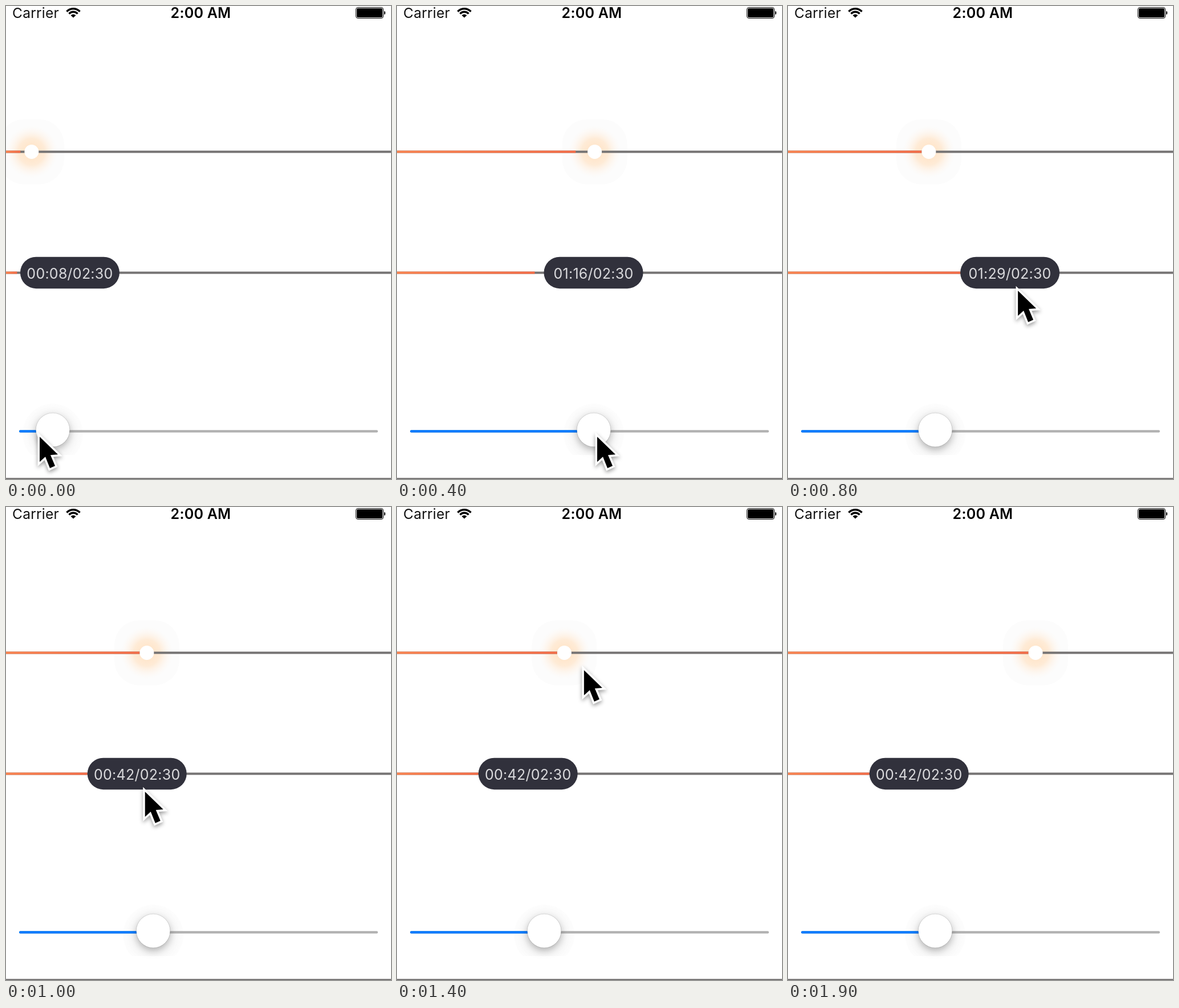
An HTML page with a canvas for the animation above (2000 ms loop, 675x829 px).

```html
<!DOCTYPE html>
<html lang="en">
<head>
<meta charset="utf-8">
<title>Sliders</title>
<style>
  html, body { margin: 0; width: 100%; height: 100%; overflow: hidden; background: #fff; }
  canvas { display: block; }
</style>
</head>
<body>
<canvas id="stage" width="675" height="829"></canvas>
<script>
const ctx = document.getElementById('stage').getContext('2d');
const W = 675, H = 829, LOOP = 2000, STEP = 100;
const FONT = 'Inter, Roboto, sans-serif';
const GRAY = '#757373';
const PILL_W = 174, PILL_RANGE = W - PILL_W;
const DOT_R = 12.5, DOT_RANGE = W - 2 * DOT_R;

const mix = (a, b, p) => a + (b - a) * p;
const progress = (t, from, to) => Math.min(1, Math.max(0, (t - from) / (to - from)));
const easeIn = p => p ** 1.52;
const easeOut = p => 1 - (1 - p) ** 1.82;
const easeInOut = p => (1 - Math.cos(Math.PI * p)) / 2;

// Drag out to a peak, then back to rest
function swing(t, start, [from, peak, rest], easeUp) {
  const up = easeUp(progress(t, start, start + STEP * 2));
  return mix(mix(from, peak, up), rest, easeInOut(progress(t, start + STEP * 2, start + STEP * 4)));
}

// The first drag moves all three sliders
const REST = .3606;
const firstDrag = (t, values) => t < 400
  ? mix(values[0], values[1], easeOut(t / 400))
  : mix(values[1], values[2], easeInOut(progress(t, 400, 600)));
const knobAt = t => firstDrag(t, [.0498, .514, REST]);
const pillAt = t => t < 600 ? knobAt(t) : swing(t, 600, [REST, .603, .2849], easeInOut);
const dotAt = t => t < 1200 ? knobAt(t) : mix(REST, .6485, easeIn(progress(t, 1200, 1700)));
const lagAt = t => t < 500 ? .011 + .021 * (t / 400) ** 2 : 0;

const pillX = t => pillAt(t) * PILL_RANGE;
const dotX = t => DOT_R + dotAt(t) * DOT_RANGE;

function cursorAt(t) {
  if (t < 700) return [firstDrag(t, [59, 351, 254]), 751 + ((t - 200) / 100) ** 2];
  const toDot = progress(t, 1000, 1200), leave = progress(t, 1700, 1800);
  return [mix(pillX(t) + 101, dotX(t) + 34.5, toDot) - 38 * leave, mix(499, 286, toDot) + 34 * leave];
}

function rect(x, y, w, h, r, color) {
  ctx.fillStyle = color;
  ctx.beginPath();
  ctx.roundRect(x, y, w, h, r);
  ctx.fill();
}

function disc(x, y, r, color) {
  ctx.fillStyle = color;
  ctx.beginPath();
  ctx.arc(x, y, r, 0, Math.PI * 2);
  ctx.fill();
}

function text(str, x, y, font, color, align) {
  ctx.font = font + ' ' + FONT;
  ctx.letterSpacing = '.25px';
  ctx.textAlign = align;
  ctx.fillStyle = color;
  ctx.fillText(str, x, y);
}

function radial(x, y, r, ...colors) {
  const g = ctx.createRadialGradient(x, y, 0, x, y, r);
  colors.forEach((color, i) => g.addColorStop(i / (colors.length - 1), color));
  disc(x, y, r, g);
}

function wifi(x, y) {
  const mid = -Math.PI / 2, spread = .82;
  ctx.strokeStyle = ctx.fillStyle = '#000';
  ctx.lineWidth = 3.4;
  for (const r of [15.8, 10.2]) {
    ctx.beginPath();
    ctx.arc(x, y, r, mid - spread, mid + spread);
    ctx.stroke();
  }
  ctx.beginPath();
  ctx.moveTo(x, y);
  ctx.arc(x, y, 6, mid - spread, mid + spread);
  ctx.fill();
}

function statusBar() {
  text('Carrier', 11, 21, '400 24.5px', '#111', 'left');
  wifi(118, 20.5);
  text('2:00 AM', 341.5, 21, '600 25px', '#000', 'center');
  ctx.strokeStyle = '#000';
  ctx.lineWidth = 1;
  ctx.beginPath();
  ctx.roundRect(613.5, 2.5, 48, 19, 3.5);
  ctx.stroke();
  rect(615, 4, 45, 16, 2, '#000');
  rect(663, 9, 2, 6, [0, 2, 2, 0], '#000');
}

function track(y, fill) {
  rect(0, y, W, 4, 0, GRAY);
  const g = ctx.createLinearGradient(0, 0, fill, 0);
  g.addColorStop(0, '#fa8451');
  g.addColorStop(1, '#f46d48');
  rect(0, y, fill, 4, 0, g);
}

function dotSlider(t) {
  const x = dotX(t), y = 255.5;
  rect(x - 57, y - 57, 114, 114, 44, '#fcfcfc');
  radial(x, y, 46, 'rgba(255,225,192,1)', 'rgba(255,232,208,.85)', 'rgba(255,247,240,0)');
  track(253.5, (dotAt(t) - lagAt(t)) * DOT_RANGE);
  disc(x, y, DOT_R, '#fff');
}

function pillSlider(t) {
  const v = pillAt(t), x = pillX(t);
  track(465.5, (v - lagAt(t)) * PILL_RANGE);
  rect(x, 439.7, PILL_W, 55.5, 27.75, '#31313c');
  const sec = Math.floor(.95 + 147.3 * v);
  const pad = n => String(n).padStart(2, '0');
  const label = pad(Math.floor(sec / 60)) + ':' + pad(sec % 60) + '/02:30';
  text(label, x + PILL_W / 2, 477.5, '400 25px', '#d9d9dc', 'center');
}

function knobSlider(t) {
  const x = 53.8 + 566.6 * knobAt(t), y = 743;
  ctx.save();
  ctx.beginPath();
  ctx.rect(0, 0, W, 787);
  ctx.clip();
  radial(x, 750, 53, '#f3f3f3', '#f6f6f6', '#fdfdfd');
  ctx.restore();
  rect(23, 743.3, 629, 4.2, 2, '#b1b1b1');
  rect(23, 743.3, x - 23, 4.2, 2, '#007aff');
  ctx.save();
  ctx.shadowColor = 'rgba(0,0,0,.28)';
  ctx.shadowBlur = 13;
  ctx.shadowOffsetY = 5;
  disc(x, y, 29.5, '#fff');
  ctx.restore();
  ctx.strokeStyle = 'rgba(0,0,0,.1)';
  ctx.lineWidth = 1;
  ctx.beginPath();
  ctx.arc(x, y, 29.8, 0, Math.PI * 2);
  ctx.stroke();
}

function cursor([x, y]) {
  const outline = [[0, 0], [0, 44], [10, 35], [18, 55], [27, 51], [19, 32], [32, 31]];
  ctx.save();
  ctx.translate(x, y);
  ctx.beginPath();
  outline.forEach(p => ctx.lineTo(...p));
  ctx.closePath();
  ctx.lineWidth = 7;
  ctx.strokeStyle = '#fff';
  ctx.shadowColor = 'rgba(0,0,0,.4)';
  ctx.shadowBlur = 7;
  ctx.shadowOffsetY = 3;
  ctx.stroke();
  ctx.shadowColor = 'transparent';
  ctx.fillStyle = '#000';
  ctx.fill();
  ctx.restore();
}

function draw(t) {
  ctx.fillStyle = '#fff';
  ctx.fillRect(0, 0, W, H);
  statusBar();
  dotSlider(t);
  pillSlider(t);
  rect(0, 827, W, 2, 0, '#7b7979');
  knobSlider(t);
  if (t < 1900) cursor(cursorAt(t));
}

let start;
function tick(now) {
  start ??= now;
  const t = (now - start) % LOOP;
  draw(Math.floor(t / STEP) * STEP);
  requestAnimationFrame(tick);
}
draw(0);
requestAnimationFrame(tick);
</script>
</body>
</html>
```
